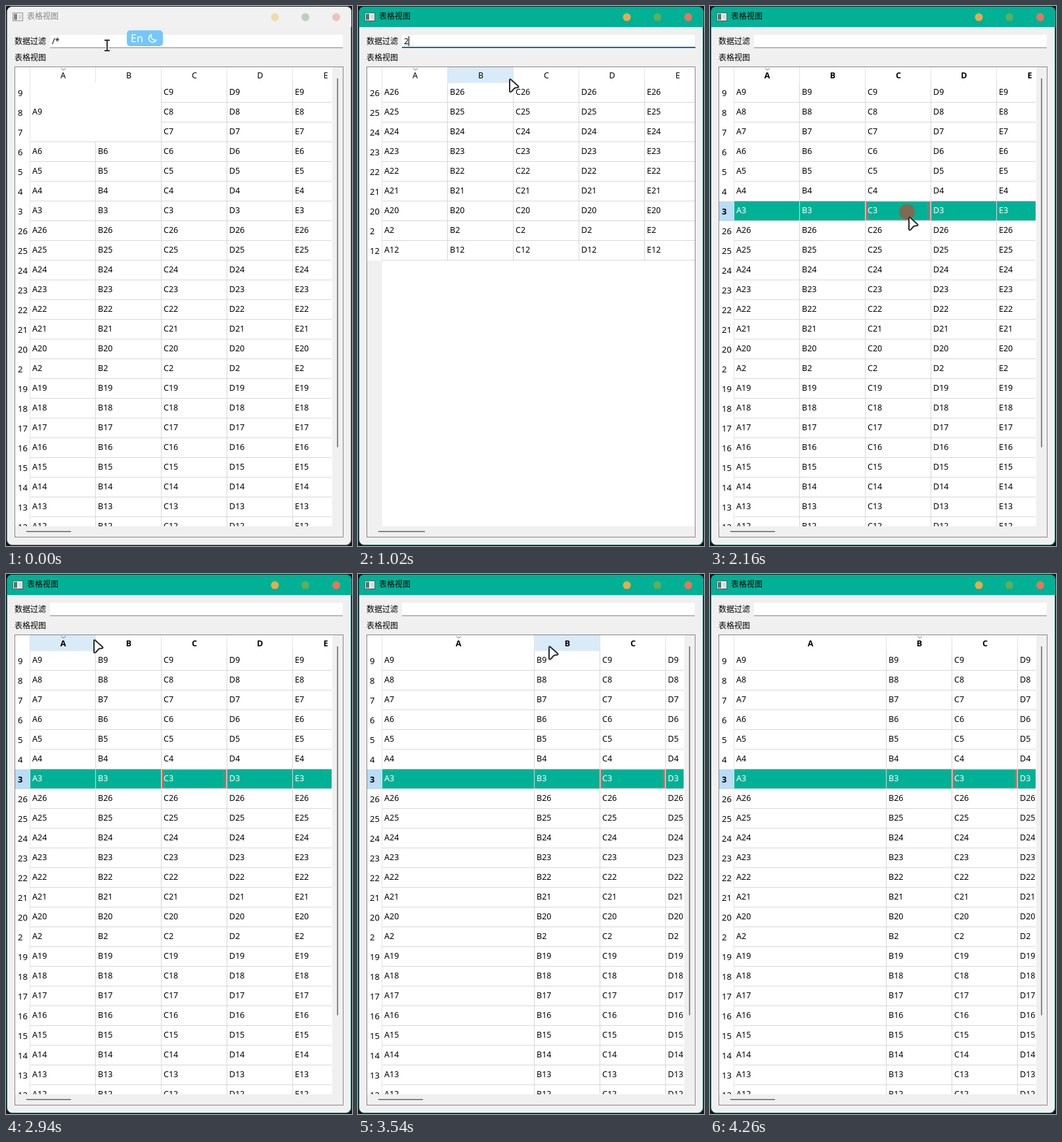
Write an HTML page that moves like this. It is 527 px wide and 821 px high and loops after 4.44 s.

```html
<!DOCTYPE html>
<html lang="zh">
<head>
<meta charset="utf-8">
<title>表格视图</title>
<style>
  html, body { margin: 0; width: 100%; height: 100%; overflow: hidden; background: #14181b; }
  svg { display: block; }
  text { font: 12.5px "Noto Sans", "Open Sans", sans-serif; white-space: pre; }
  .cjk { font: 12px "Noto Sans CJK SC", "Noto Sans CJK", sans-serif; }
  .num { font-size: 13px; }
  .bold { font-weight: 700; }
  .ime { font-size: 16px; }
</style>
</head>
<body>
<svg id="stage" width="527" height="821" viewBox="0 0 527 821"></svg>
<script>
const LOOP = 4440, TICK = 60;
const TEAL = '#00b195', LINE = '#d8d8d8', GRAY = '#868686', PANEL = '#f0f0f0';
const ROW_H = 30, LEFT = 37, TOP = 117;

// Rows are ordered as strings: 1, 10, 11 ... 2, 20 ... 9
const ascending = Array.from({ length: 26 }, (_, i) => String(i + 1)).sort();
const descending = [...ascending].reverse();

// Stepped tracks: [start, value]
const filterText = [[0, '/*'], [600, '1'], [780, ''], [1020, '2'], [1260, '']];
const hoverCol = [[0, -1], [420, 1], [1560, -1], [2880, 0], [3420, 1], [4140, -1]];
const presses = [[60, 240], [1740, 1860], [2160, 2220], [3060, 3360], [3660, 3720], [3960, 4020]];
const cursorKind = [[0, 'beam'], [360, 'arrow'], [3060, 'split'], [3420, 'arrow'], [4260, 'none']];

// Eased tracks: [time, ...values]
const cursorPath = [
  [0, 154, 60], [60, 154, 60], [180, 80, 57], [240, 68, 57], [300, 100, 66],
  [360, 145, 82], [420, 179, 94], [540, 230, 110], [1500, 230, 110],
  [1560, 238, 135], [1740, 302, 320], [2220, 302, 320], [2280, 398, 331],
  [2460, 398, 331], [2520, 398, 342], [2580, 385, 332], [2940, 133, 99],
  [3000, 133, 99], [3060, 136, 97], [3360, 268, 100], [3540, 290, 109],
  [3600, 298, 109], [3900, 300, 112], [4080, 300, 112], [4200, 318, 170], [4440, 318, 170]
];
const firstWidth = [[0, 100], [3060, 100], [3360, 232], [4440, 232]];

const held = (track, t) => track.filter(k => k[0] <= t).pop()[1];
const within = (t, [a, b]) => t >= a && t < b;

function tween(track, t) {
  let i = track.findIndex(k => k[0] > t);
  if (i < 0) i = track.length - 1;
  const [t0, ...a] = track[i - 1], [t1, ...b] = track[i];
  const p = Math.min(1, (t - t0) / (t1 - t0));
  return a.map((v, n) => Math.round(v + (b[n] - v) * p));
}

const rect = (x, y, w, h, fill, extra = '') =>
  `<rect x="${x}" y="${y}" width="${w}" height="${h}" fill="${fill}" ${extra}/>`;
const text = (x, y, s, cls = '', fill = '#000', anchor = 'start') =>
  `<text x="${x}" y="${y}" class="${cls}" fill="${fill}" text-anchor="${anchor}">${s}</text>`;
const circle = (x, y, r, fill) => `<circle cx="${x}" cy="${y}" r="${r}" fill="${fill}"/>`;
const path = (d, stroke, width = 1, fill = 'none') =>
  `<path d="${d}" fill="${fill}" stroke="${stroke}" stroke-width="${width}" stroke-linejoin="round"/>`;
const clip = (x, y, w, h, body) =>
  `<svg x="${x}" y="${y}" width="${w}" height="${h}" viewBox="${x} ${y} ${w} ${h}">${body}</svg>`;

function chrome(active) {
  const dots = active ? ['#eaaa4c', '#5cb159', '#ea7558'] : ['#f0dba9', '#bad1bf', '#ecc3b8'];
  const bar = 'M2 32V9Q2 1 10 1H518Q526 1 526 9V32Z';
  return rect(1.5, 1.5, 524, 818, PANEL, `rx="8" stroke="${active ? '#0d7567' : '#777'}"`) +
    `<path d="${bar}" fill="${active ? TEAL : '#f1f1f1'}"/>` +
    rect(10.5, 10.5, 15, 12, '#f4f4f4', `stroke="${active ? '#4e5f5c' : '#8c8c8c'}"`) +
    rect(12, 12, 5, 9, active ? '#58706c' : '#7d8886') + rect(19, 13, 5, 7, '#d5dad9') +
    text(32, 20, '表格视图', 'cjk', active ? '#000' : '#858585') +
    dots.map((c, i) => circle([409.5, 456, 503][i], 17, 6, c)).join('') +
    text(13, 58, '数据过滤', 'cjk') + text(13, 83, '表格视图', 'cjk');
}

function editor(t, value) {
  const focused = within(t, [60, 1740]);
  const selected = within(t, [180, 600]);
  let out = rect(67, 44, 446, 19, '#fff') +
    (focused ? rect(67, 62, 447, 2, '#0067b8') : rect(67, 63, 446, 1, GRAY));
  if (selected) out += rect(70, 46, 11, 16, TEAL);
  out += text(70, 58, value, '', selected ? '#fff' : '#000');
  if (focused && t < 1380) {
    const x = selected ? 70 : 70 + value.length * 7;
    out += rect(x, 46, 1, 15, selected ? '#ff4e6a' : '#000');
  }
  return out;
}

function columns(width) {
  let x = LEFT;
  return [...'ABCDE'].map((name, i) => {
    const w = i ? 100 : width, col = { name, x, w };
    x += w;
    return col;
  });
}

function focusFrame({ x, w }, y) {
  const edge = '#e2565c';
  return rect(x, y, 3, 29, edge) + rect(x + w - 4, y, 3, 29, edge) +
    `<rect x="${x + .5}" y="${y + .5}" width="${w - 2}" height="28" fill="none" stroke="#d9c6bd" stroke-dasharray="1 1"/>`;
}

function cells(rows, cols, picked, spanned) {
  let out = '';
  rows.forEach((row, r) => {
    const y = TOP + r * ROW_H, on = picked && row === '3';
    if (on) out += rect(LEFT, y + 180 - 180, 480, 29, TEAL);
    out += rect(LEFT, y + 29, 480, 1, LINE);
    cols.forEach((c, i) => {
      out += rect(c.x + c.w - 1, y, 1, 30, LINE);
      if (on && i === 2) out += focusFrame(c, y);
      out += text(c.x + 3, y + 18, c.name + row, '', on ? '#fff' : '#000');
    });
  });
  if (spanned) out += rect(LEFT, TOP, 199, 89, '#fff') + text(40, 165, 'A9');
  return out;
}

function table(t, value) {
  const picked = t >= 1740;
  const order = within(t, [3720, 4020]) ? ascending : descending;
  const rows = order.filter(r => value === '/*' || r.includes(value));
  const full = rows.length === 26;
  const right = full ? 496 : 513;
  const cols = columns(tween(firstWidth, t)[0]);
  const hover = held(hoverCol, t);
  const sorted = cols[t >= 3720 ? 1 : 0];

  let head = '';
  cols.forEach((c, i) => {
    if (i === hover) head += rect(c.x, 93, c.w, 24, '#d9ebf9');
    head += rect(c.x + c.w - 1, 93, 1, 24, '#e3e3e3') +
      text(c.x + c.w / 2, 110, c.name, picked ? 'bold' : '', '#000', 'middle');
  });
  const mid = sorted.x + sorted.w / 2 + .5;
  head += path(order === ascending ? `M${mid - 3.5} 97.5l3.5 -3l3.5 3` : `M${mid - 3.5} 94.5l3.5 3l3.5 -3`, '#6b6b6b');

  let side = rect(14, 93, 22, 698, '#fff');
  rows.forEach((row, r) => {
    const y = TOP + r * ROW_H, on = picked && row === '3';
    if (on) side += rect(14, y, 22, 30, '#bbdcf3');
    side += text(18, y + 20, row, on ? 'num bold' : 'num');
  });
  const end = TOP + rows.length * ROW_H;
  if (!full && end < 791) side += rect(14, end, 23, 791 - end, PANEL);
  side += rect(36, 93, 1, Math.min(end, 791) - 93, '#e3e3e3');

  return rect(13.5, 92.5, 500, 715, '#fff', `stroke="${GRAY}"`) +
    clip(LEFT, 93, right - LEFT, 24, head) +
    clip(LEFT, TOP, right - LEFT, 674, cells(rows, cols, picked, value === '/*')) +
    clip(14, 93, 23, 698, side) +
    rect(14, 791, 499, 16, PANEL) + rect(31, 798, full ? 68 : 71, 2, GRAY) +
    (full ? rect(497, 93, 16, 698, PANEL) + rect(504, 110, 2, 561, GRAY) : '');
}

function imeBadge() {
  return rect(184, 37, 55, 24, '#74c7fb', 'rx="5"') +
    text(190, 54.5, 'En', 'ime', '#fff') +
    path('M221.5 43.5A6 6 0 1 0 229 51.5A6 6 0 0 1 221.5 43.5Z', '#fff', 1.4);
}

function pointer(t) {
  const [x, y] = tween(cursorPath, t), kind = held(cursorKind, t);
  const shapes = {
    none: '',
    beam: path('M-4 -8H4M0 -8V8M-4 8H4', '#fff', 4) + path('M-4 -8H4M0 -8V8M-4 8H4', '#333', 2),
    arrow: path('M1 2.5Q1 .5 2.8 1.8L14 11.8Q15.5 13.6 13 14L8.5 14.8L3.5 20.2Q1.2 21.8 1 19.5Z', '#29292e', 2, '#fff'),
    split: path('M-2 -7V7M2 -7V7M-3 0H-9M-6 -3L-9 0L-6 3M3 0H9M6 -3L9 0L6 3', '#333', 1.5)
  };
  const beam = kind === 'beam';
  const ring = presses.some(p => within(t, p))
    ? `<circle cx="${beam ? x : x - 2}" cy="${beam ? y : y - 7}" r="12" fill="#fe2310" fill-opacity=".5"/>` : '';
  return ring + `<g transform="translate(${x} ${y})">${shapes[kind]}</g>`;
}

const stage = document.getElementById('stage');
let shown = -1;

function draw(now) {
  const t = Math.floor((now % LOOP) / TICK) * TICK;
  if (t !== shown) {
    shown = t;
    const value = held(filterText, t);
    stage.innerHTML = chrome(t >= 60) + editor(t, value) + table(t, value) +
      (t < 240 ? imeBadge() : '') + pointer(t);
  }
}

const start = performance.now();
function loop() {
  draw(performance.now() - start);
  requestAnimationFrame(loop);
}
loop();
</script>
</body>
</html>
```
